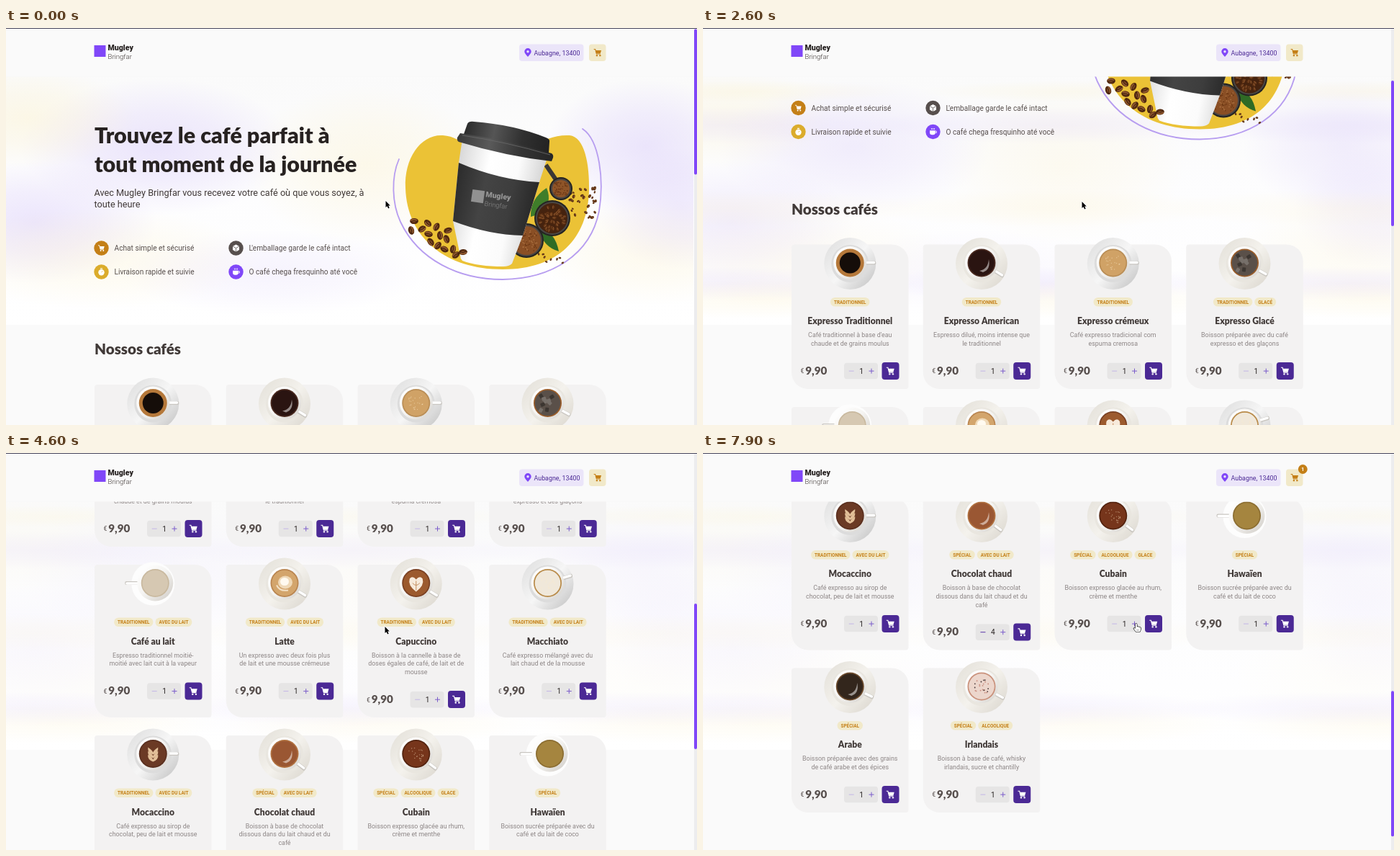
Write an HTML page with a canvas that moves like this. It is 960x551 px and loops after 8000 ms.

```html
<!DOCTYPE html>
<html lang="fr">
<head>
<meta charset="utf-8">
<title>Cafés</title>
<style>
html, body { margin: 0; width: 100%; height: 100%; overflow: hidden; background: #fafafa; }
canvas { display: block; width: 960px; height: 551px; }
</style>
</head>
<body>
<canvas id="stage" width="960" height="551"></canvas>
<script>
const ctx = document.getElementById('stage').getContext('2d');
const LOOP = 8000, STEP = 100, TAU = Math.PI * 2;
const C = {
  page: '#fafafa', card: '#f3f2f2', field: '#e6e5e5', title: '#272221', subtitle: '#403937',
  text: '#574f4d', label: '#8d8686', purple: '#8047f8', deep: '#4b2995', lilac: '#ebe5f9',
  yellow: '#dbac2c', amber: '#c47f17', cream: '#f1e9c9'
};
const BODY = 'Roboto, sans-serif', DISPLAY = 'Lato, sans-serif';
const BRAND = ['Mugley', 'Bringfar'];

// name, description lines, tags, coffee colour, rim colour, handle angle, topping
const T = 'TRADITIONNEL', L = 'AVEC DU LAIT', S = 'SPÉCIAL', A = 'ALCOOLIQUE';
const products = [
  ['Expresso Traditionnel', ["Café traditionnel à base d'eau", 'chaude et de grains moulus'], [T], '#150d09', '#b5783a', 0, ''],
  ['Expresso American', ['Espresso dilué, moins intense que', 'le traditionnel'], [T], '#2a1411', '#4a2a20', .55, 'shine'],
  ['Expresso crémeux', ['Café expresso tradicional com', 'espuma cremosa'], [T], '#d0a266', '#b98d55', 0, 'foam'],
  ['Expresso Glacé', ['Boisson préparée avec du café', 'expresso et des glaçons'], [T, 'GLACÉ'], '#5a5049', '#9a5d2a', .5, 'ice'],
  ['Café au lait', ['Espresso traditionnel moitié-', 'moitié avec lait cuit à la vapeur'], [T, L], '#d6c8b2', '#c9b99f', Math.PI, ''],
  ['Latte', ['Un expresso avec deux fois plus', 'de lait et une mousse crémeuse'], [T, L], '#d3a56c', '#b98550', .55, 'swirl'],
  ['Capuccino', ['Boisson à la cannelle à base de', 'doses égales de café, de lait et de', 'mousse'], [T, L], '#9c5a2e', '#7a4022', .55, 'heart'],
  ['Macchiato', ['Café expresso mélangé avec du', 'lait chaud et de la mousse'], [T, L], '#f0e8da', '#b88a48', -.3, 'foam'],
  ['Mocaccino', ['Café expresso au sirop de', 'chocolat, peu de lait et mousse'], [T, L], '#6b3a25', '#5a2f1f', 0, 'leaf'],
  ['Chocolat chaud', ['Boisson à base de chocolat', 'dissous dans du lait chaud et du', 'café'], [S, L], '#9a5733', '#b0703f', .65, 'shine'],
  ['Cubain', ['Boisson expresso glacée au rhum,', 'crème et menthe'], [S, A, 'GLACE'], '#76351b', '#53230f', .65, 'foam'],
  ['Hawaïen', ['Boisson sucrée préparée avec du', 'café et du lait de coco'], [S], '#a5853f', '#8b6d31', Math.PI, ''],
  ['Arabe', ['Boisson préparée avec des grains', 'de café arabe et des épices'], [S], '#33261c', '#6b4a2c', .45, 'shine'],
  ['Irlandais', ['Boisson à base de café, whisky', 'irlandais, sucre et chantilly'], [S, A], '#ecd6cc', '#c9907a', .5, 'dots']
];
const rowTops = [495, 720.5, 957.5, 1194.5], rowHeights = [200.5, 212, 212, 200.5];

const scrollKeys = [[0, 0], [1000, 0], [1100, 28], [1200, 60], [1300, 78], [1900, 79], [2200, 120],
  [2500, 180], [2600, 194.5], [2800, 197], [2900, 215], [3300, 318], [3400, 318], [3500, 330], [3900, 415],
  [4100, 435.5], [4300, 462], [4700, 600], [5000, 742], [5100, 800.5], [5200, 848], [5300, 880], [5500, 896]];
const pointerKeys = [[0, 527.5, 240], [700, 527.5, 240], [800, 526.5, 241], [5500, 526.5, 241], [5900, 458, 247],
  [6100, 434, 250], [6200, 423, 251], [6300, 416, 248], [6800, 416, 248], [7000, 442, 248], [7200, 442, 248],
  [7600, 590, 239], [7700, 600, 237], [7900, 602, 237]];

function sample(keys, t, i = 1) {
  const n = keys.findIndex(k => k[0] > t);
  if (n < 0) return keys[keys.length - 1][i];
  const a = keys[n - 1], b = keys[n];
  return a[i] + (b[i] - a[i]) * (t - a[0]) / (b[0] - a[0]);
}

function random(seed) {
  return () => (seed = (seed * 16807) % 2147483647) / 2147483647;
}

function text(s, x, y, size, color, { weight = 400, family = BODY, align = 'left' } = {}) {
  ctx.font = `${weight} ${size}px ${family}`;
  ctx.textAlign = align;
  ctx.fillStyle = color;
  ctx.fillText(s, x, y + size * .35);
}

function box(x, y, w, h, r, color) {
  ctx.fillStyle = color;
  ctx.beginPath();
  ctx.roundRect(x, y, w, h, r);
  ctx.fill();
}

function oval(x, y, rx, ry, color, angle = 0) {
  ctx.fillStyle = color;
  ctx.beginPath();
  ctx.ellipse(x, y, rx, ry, angle, 0, TAU);
  ctx.fill();
}
const disc = (x, y, r, color) => oval(x, y, r, r, color);

function shape(d, color, width) {
  const path = new Path2D(d);
  if (width) {
    ctx.strokeStyle = color;
    ctx.lineWidth = width;
    ctx.stroke(path);
  } else {
    ctx.fillStyle = color;
    ctx.fill(path);
  }
}

function at(x, y, draw, scale = 1, angle = 0) {
  ctx.save();
  ctx.translate(x, y);
  ctx.rotate(angle);
  ctx.scale(scale, scale);
  draw();
  ctx.restore();
}

function linear(x0, y0, x1, y1, ...colors) {
  const g = ctx.createLinearGradient(x0, y0, x1, y1);
  colors.forEach((c, i) => g.addColorStop(i / (colors.length - 1), c));
  return g;
}

function haze(x, y, rx, ry, rgb, alpha) {
  ctx.save();
  ctx.translate(x, y);
  ctx.scale(rx, ry);
  const g = ctx.createRadialGradient(0, 0, 0, 0, 0, 1);
  g.addColorStop(0, `rgba(${rgb},${alpha})`);
  g.addColorStop(.5, `rgba(${rgb},${alpha * .6})`);
  g.addColorStop(1, `rgba(${rgb},0)`);
  ctx.fillStyle = g;
  ctx.fillRect(-1, -1, 2, 2);
  ctx.restore();
}

function cartIcon(x, y, scale, color) {
  at(x, y, () => {
    shape('M-6 -5H-3.7L-1.8 2.3H4.3', color, 1.2);
    shape('M-3.4 -3.3H5.6L4.2 1.5H-2.1Z', color);
    disc(-1.2, 4.6, 1.3, color);
    disc(3.7, 4.6, 1.3, color);
  }, scale);
}

function backdrop(scroll) {
  const moved = Math.min(1, scroll / 435), purple = '218,205,250', yellow = '252,240,196';
  ctx.fillStyle = C.page;
  ctx.fillRect(0, 0, 960, 551);
  ctx.fillStyle = linear(0, 60, 0, 412, '#fafafa', '#fdfdfe', '#ffffff');
  ctx.fillRect(0, 60, 960, 352);
  ctx.save();
  ctx.beginPath();
  ctx.rect(0, 60, 955, 352);
  ctx.clip();
  const a = 1 - moved * .75;
  haze(210, 165, 190, 95, purple, .5 * a);
  haze(30, 125, 150, 70, yellow, .38 * a);
  haze(40, 270, 170, 85, purple, .5 * a);
  haze(130, 320, 220, 70, yellow, .28 * a);
  haze(370, 340, 210, 60, purple, .22 * a);
  haze(500, 190, 170, 110, yellow, .34 * a);
  haze(890, 165, 140, 95, purple, .5 * a);
  haze(900, 310, 160, 75, yellow, .3 * a);
  haze(940, 250, 120, 85, purple, .38 * a);
  if (scroll > 0) {
    const b = Math.min(1, scroll / 78) * (1 - moved * .35);
    for (const x of [40, 480, 900]) {
      haze(x, 135, 260, 26, purple, .26 * b);
      haze(x + 30, 88, 210, 15, yellow, .25 * b);
      haze(x, 250, 270, 26, yellow, .2 * b);
      haze(x, 355, 260, 24, purple, .3 * b);
      haze(x + 40, 376, 220, 28, yellow, .26 * b);
    }
  }
  ctx.restore();
}

function bean(x, y, angle, size = 1) {
  at(x, y, () => {
    oval(0, 0, 6.2, 4.3, '#52290f');
    oval(-.5, -1, 4.8, 2.5, '#8b542b');
    shape('M-5 .6Q0 -1.8 5 .8', '#35190a', 1);
  }, size, angle);
}

function bowl(x, y, r, fill) {
  disc(x, y, r, '#242322');
  disc(x, y, r - 2, '#4a4643');
  disc(x, y, r - 4, fill);
}

function heroArt() {
  shape('M555 222C553 180 577 147 607 149C637 151 646 178 684 178C726 178 742 147 783 149C804 151 811 190 810 226C808 292 768 335 690 335C612 335 557 292 555 222Z', '#ebc236');
  ctx.lineCap = 'round';
  shape('M546 182C535 207 536 243 548 269C573 322 629 349 690 349C758 348 812 315 824 254C831 212 825 156 801 140', '#b79df0', 1.8);
  ctx.lineCap = 'butt';

  const rnd = random(41);
  for (let i = 0; i < 28; i++) bean(784 + rnd() * 36, 222 + rnd() * 42, rnd() * 3, .22 + rnd() * .25);
  for (let i = 0; i < 8; i++) bean(736 + rnd() * 40, 312 + rnd() * 17, rnd() * 3, .3);
  shape('M750 190L765 212', '#3a3836', 6);
  bowl(771, 223, 16, '#8e5428');
  for (let i = 0; i < 60; i++) disc(771 + (rnd() - .5) * 18, 223 + (rnd() - .5) * 18, .8, '#6a3716');
  shape('M729 262Q728 237 751 222Q760 243 742 258Z', '#3f7d2a');
  shape('M742 283Q762 280 768 310Q747 304 742 283Z', '#2f6b25');
  bowl(759, 264, 25, '#45230f');
  for (let i = 0; i < 48; i++) {
    const turn = rnd() * TAU, reach = Math.sqrt(rnd()) * 18;
    bean(759 + Math.cos(turn) * reach, 264 + Math.sin(turn) * reach, turn, .48);
  }
  bowl(723, 295, 24, '#8a4f25');
  for (let i = 0; i < 90; i++) disc(723 + (rnd() - .5) * 29, 295 + (rnd() - .5) * 29, .9, i % 2 ? '#6d3814' : '#a96f3f');

  // paper cup
  shape('M634 154L752 180L741 214L718 288L703 327Q699 331 691 331Q656 331 634 323Q631 320 631 316L621 268L629 187Z', linear(620, 230, 742, 255, '#d9d9d9', '#ffffff', '#fbfbfb', '#cfcfcf'));
  shape('M629 187Q685 211 741 214L718 288Q670 287 621 268Z', linear(622, 230, 738, 255, '#2d2d2d', '#444444', '#3d3d3d', '#252525'));
  shape('M641 133Q643 129 650 130Q705 134 750 152Q756 154 755 158L754 174L635 150Z', linear(638, 140, 756, 165, '#2c2c2c', '#555555', '#303030', '#222222'));
  shape('M631 146Q695 155 758 174Q761 176 760 180L758 185Q695 178 629 158Q626 156 627 152Z', linear(628, 150, 760, 178, '#3a3a3a', '#5a5a5a', '#343434', '#262626'));
  shape('M634 149Q695 158 756 176', '#6b6b6b', .8);
  at(655, 234, () => {
    box(-8, -9, 17, 17, 0, '#919191');
    text(BRAND[0], 11, -5, 10.5, '#969696', { weight: 900 });
    text(BRAND[1], 11, 8, 9.2, '#8c8c8c', { weight: 300 });
  }, 1, .14);

  [[567, 268], [563, 281], [578, 279], [586, 271], [598, 276], [587, 286], [603, 288], [614, 281],
   [590, 297], [600, 302], [609, 307], [621, 307], [635, 311], [612, 293], [625, 315]]
    .forEach(([x, y], i) => bean(x, y, i * 1.3, .95));
}

const features = [
  [132.5, 305.5, 'Achat simple et sécurisé', C.amber, () => cartIcon(0, 0, .75, '#fff')],
  [319.5, 305.5, "L'emballage garde le café intact", C.text, () => {
    shape('M0 -5L4.5 -2.6V2.5L0 5L-4.5 2.5V-2.6Z', '#fff');
    shape('M-4.4 -2.5L0 0L4.4 -2.5M0 0V5', C.text, .8);
  }],
  [132.5, 338.5, 'Livraison rapide et suivie', C.yellow, () => {
    disc(0, .7, 4.2, '#fff');
    box(-1.6, -5.2, 3.2, 1.1, 0, '#fff');
    shape('M0 .7L1.8 -1.2', C.yellow, .8);
  }],
  [319.5, 338.5, 'O café chega fresquinho até você', C.purple, () => {
    box(-4.4, -1.8, 7.6, 6, [0, 0, 3, 3], '#fff');
    shape('M3 -.8H4.8V1.5H3M-2 -5V-3M0 -5V-3M2 -5V-3', '#fff', .9);
  }]
];

function hero() {
  const head = { weight: 900, family: DISPLAY };
  text('Trouvez le café parfait à', 123, 149.5, 30.5, C.title, head);
  text('tout moment de la journée', 123, 189, 30.5, C.title, head);
  text(`Avec ${BRAND.join(' ')} vous recevez votre café où que vous soyez, à`, 122.5, 228.5, 12.7, C.subtitle);
  text('toute heure', 122.5, 245, 12.7, C.subtitle);
  for (const [x, y, label, color, icon] of features) {
    disc(x, y, 10.2, color);
    at(x, y, icon);
    text(label, x + 18, y + .3, 10.17, C.text);
  }
  heroArt();
  text('Nossos cafés', 123, 446, 20.6, C.subtitle, head);
}

function topping(kind, rnd) {
  const white = '#f7eadb';
  if (kind === 'shine') {
    shape('M-3 11Q9 9 10 -5Q13 9 2 13Z', 'rgba(255,255,255,.5)');
  } else if (kind === 'foam') {
    for (let i = 0; i < 24; i++) disc((rnd() - .5) * 20, (rnd() - .5) * 20, .7, 'rgba(255,235,200,.45)');
  } else if (kind === 'ice') {
    for (let i = 0; i < 9; i++) at((rnd() - .5) * 20, (rnd() - .5) * 20, () => box(-3, -3, 6, 5, 1, i % 2 ? '#3c3631' : '#77706a'), 1, rnd() * 3);
  } else if (kind === 'swirl') {
    oval(1, -1, 10, 9, '#efd9b8');
    oval(0, -2, 6, 5.5, '#fffaf0');
    shape('M-11 3Q-7 12 5 10', '#f3e1c6', 2);
  } else if (kind === 'heart') {
    shape('M0 12Q-12 3 -9 -6Q-5 -11 0 -5Q5 -11 9 -6Q12 3 0 12Z', white);
    shape('M0 10V-3M-5 0Q0 6 5 0', '#c48d5e', 1);
  } else if (kind === 'leaf') {
    for (let i = -1; i < 2; i++) shape(`M0 ${i * 5 + 6}Q-8 ${i * 5 + 3} -7 ${i * 5 - 4}Q-1 ${i * 5} 0 ${i * 5 + 3}Q1 ${i * 5} 7 ${i * 5 - 4}Q8 ${i * 5 + 3} 0 ${i * 5 + 6}Z`, '#e2bf98');
  } else if (kind === 'dots') {
    for (let i = 0; i < 22; i++) disc((rnd() - .5) * 19, (rnd() - .5) * 19, .9, i % 3 ? '#c98f80' : '#4a3a3a');
  }
}

function coffee(x, y, index) {
  const [, , , fill, rim, angle, kind] = products[index];
  const leftHandle = angle > 3, grey = angle <= 0;
  at(x, y, () => {
    disc(0, 1, leftHandle ? 30 : 36, leftHandle ? '#fdfdfd' : grey
      ? linear(-30, -25, 30, 30, '#e2e2e2', '#f6f6f6', '#c9c9c9')
      : linear(-30, -25, 30, 30, '#e6e3dc', '#f4f2ed', '#dedad2'));
    if (!leftHandle) disc(0, 1, 26, grey ? '#dcdcdc' : '#e9e6df');
    at(0, 0, () => {
      box(18, -2.6, leftHandle ? 21 : 18, 5.2, 2, '#c9c6c1');
      box(18, -2.2, leftHandle ? 20 : 17, 3.4, 2, '#ffffff');
    }, 1, angle);
    const cx = leftHandle ? 3 : 0;
    disc(cx, 0, leftHandle ? 25 : 23, linear(-20, -20, 20, 20, '#ffffff', '#f5f4f2', '#d8d5d0'));
    disc(cx, 0, 19.5, rim);
    disc(cx, 0, index ? 17.8 : 14.5, fill);
    topping(kind, random(index * 97 + 13));
  });
}

function tags(labels, center, y) {
  ctx.font = `700 6.37px ${BODY}`;
  const widths = labels.map(s => ctx.measureText(s).width + 10);
  let x = center - (widths.reduce((a, b) => a + b) + 3 * (labels.length - 1)) / 2;
  labels.forEach((s, i) => {
    box(x, y - 6.3, widths[i], 12.6, 6.3, C.cream);
    text(s, x + 5, y + .2, 6.37, C.amber, { weight: 700 });
    x += widths[i] + 3;
  });
}

function card(index, scroll, state) {
  const row = index >> 2, x = 123 + (index % 4) * 182.75, y = rowTops[row] - scroll;
  if (y > 600 || y + rowHeights[row] < 50) return;
  const [name, lines, labels] = products[index];
  const mid = x + 81.25, chosen = index === 9;
  box(x, y, 162.5, rowHeights[row], [4, 23, 4, 23], C.card);
  coffee(mid, y + 25.5, index);
  tags(labels, mid, y + 79.8);
  text(name, mid, y + 106.3, 12.1, C.subtitle, { weight: 900, family: DISPLAY, align: 'center' });
  lines.forEach((s, i) => text(s, mid, y + 125.7 + i * 11.6, 8.9, C.label, { align: 'center' }));

  const base = y + 175 + (lines.length - 2) * 11.6, qty = chosen ? state.qty : 1;
  text('€', x + 12.5, base + .8, 8.9, C.text);
  text('9,90', x + 19.2, base, 15.2, C.text, { weight: 900, family: DISPLAY });
  box(x + 73, base - 10.7, 47, 22.5, 4, C.field);
  shape(`M${x + 79.7} ${base + .6}h7`, qty > 1 ? '#5b35a8' : '#c3b6e6', 1);
  text(qty, x + 97, base + .5, 10.2, C.title, { align: 'center' });
  shape(`M${x + 107.5} ${base + .6}h7m-3.5 -3.5v7`, '#7b5ccb', 1);
  box(x + 125.5, base - 11.5, 24, 24, 4, chosen ? state.cart : C.deep);
  cartIcon(x + 137.4, base + .5, .95, '#fff');
}

function header(badge) {
  ctx.fillStyle = C.page;
  ctx.fillRect(0, 0, 956, 67.5);
  box(122.5, 24, 16, 16, 0, C.purple);
  text(BRAND[0], 141.5, 27, 10.6, C.title, { weight: 900 });
  text(BRAND[1], 141.5, 40, 9.6, C.subtitle, { weight: 300 });
  box(713, 22.5, 89.5, 23.5, 4, C.lilac);
  shape('M725 40C722 36.5 720.3 34.8 720.3 32.8A4.7 4.7 0 0 1 729.7 32.8C729.7 34.8 728 36.5 725 40Z', C.purple);
  disc(725, 32.8, 1.7, C.lilac);
  text('Aubagne, 13400', 733.5, 34.5, 8.9, C.deep);
  box(810, 22.5, 23.5, 23.5, 4, C.cream);
  cartIcon(822, 34, .9, C.amber);
  if (badge) {
    disc(833.3, 22.5, 6.4, C.amber);
    text('1', 833.3, 22.7, 7.6, '#fff', { weight: 700, align: 'center' });
  }
}

function scrollbar(scroll) {
  ctx.fillStyle = '#ececee';
  ctx.fillRect(956, 0, 4, 551);
  box(956, 1.5 + scroll * .367, 4, 202, 2, C.purple);
  ctx.fillStyle = '#45435a';
  ctx.fillRect(0, 0, 960, 1);
}

function pointer(t) {
  const hand = (t >= 6000 && t < 6200) || (t >= 6300 && t < 7300) || t >= 7700;
  const d = hand
    ? 'M-1.3 .9Q-1.3 -.2 -.3 -.2Q.8 -.2 .8 1V4.2Q2 3.5 2.8 4.5Q4 4 4.5 5Q6.2 4.7 6.2 6.3Q6.2 9.5 4.8 11.2H-.3Q-2.2 9 -3.7 6.7Q-3.2 5.3 -1.3 6.7Z'
    : 'M0 0V9L2 7.2L3.6 10.6L5.2 9.8L3.7 6.6H6.3Z';
  at(sample(pointerKeys, t), sample(pointerKeys, t, 2), () => {
    shape(d, hand ? '#111' : '#fff', hand ? 1.3 : 1.6);
    shape(d, hand ? '#fff' : '#000');
    if (hand) shape('M1 8V9.6M2.8 8V9.6', '#333', .6);
  });
}

function cartColor(t) {
  if ((t >= 6000 && t < 6200) || (t >= 6900 && t < 7200)) return C.purple;
  if ((t >= 6200 && t < 6300) || (t >= 7200 && t < 7300)) return '#6237b3';
  return C.deep;
}

function render(t) {
  const scroll = sample(scrollKeys, t);
  const state = { qty: 1 + [6400, 6600, 6900].filter(k => t >= k).length, cart: cartColor(t) };
  backdrop(scroll);
  if (scroll < 420) at(0, -scroll, hero);
  products.forEach((_, i) => card(i, scroll, state));
  header(t >= 7100);
  scrollbar(scroll);
  pointer(t);
}

let shown = -1;
function tick(now) {
  const t = Math.floor((now % LOOP) / STEP) * STEP;
  if (t !== shown) render(shown = t);
  requestAnimationFrame(tick);
}
render(0);
requestAnimationFrame(tick);
</script>
</body>
</html>
```
